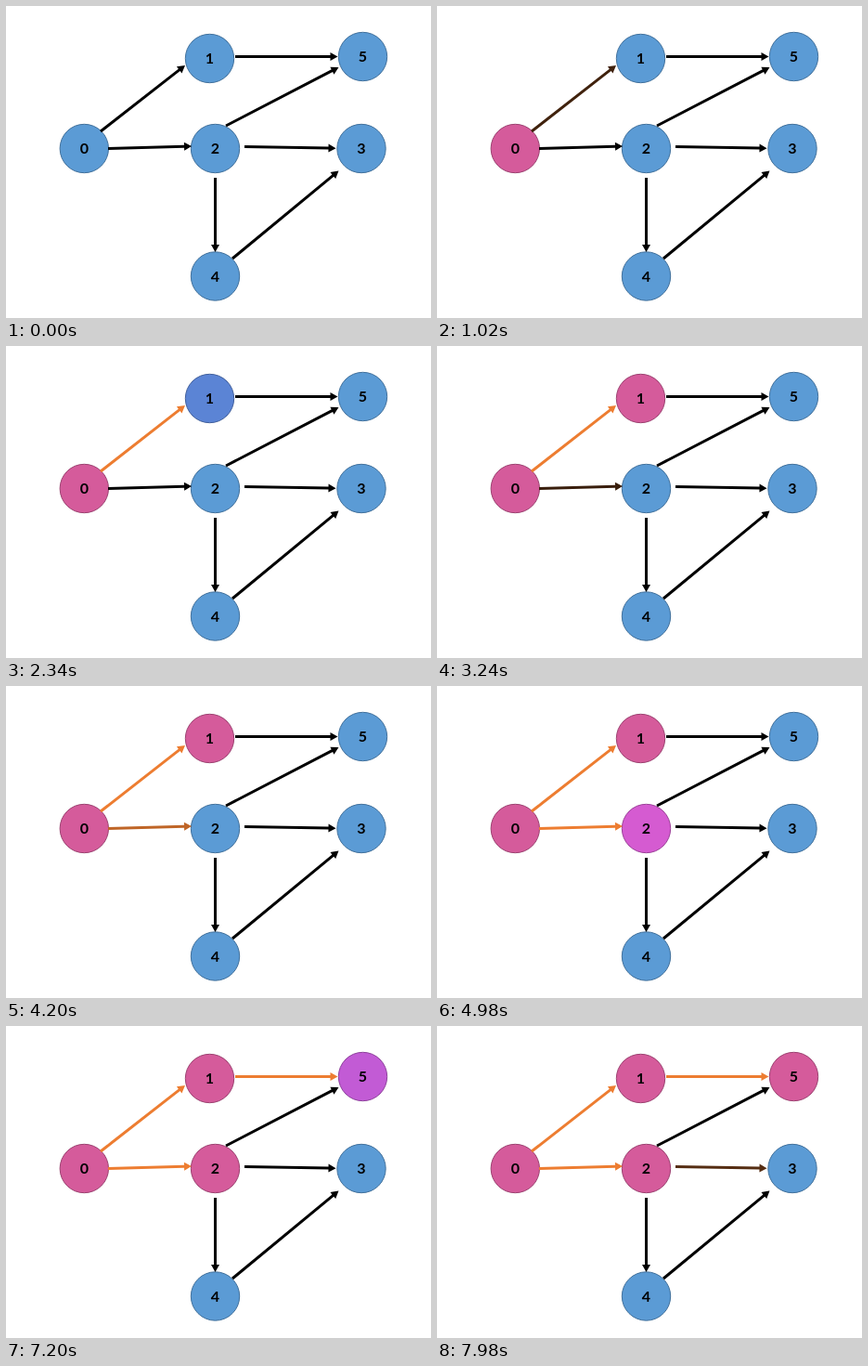
An HTML page that plays this animation: 458 by 336 pixels, repeating every 8000 ms.

```html
<!DOCTYPE html>
<html lang="en">
<head>
<meta charset="utf-8">
<title>Graph traversal</title>
<style>
  html, body { margin: 0; width: 100%; height: 100%; overflow: hidden; background: #fff; }
  svg { display: block; width: 458px; height: 336px; }
  text { font: 700 16px Lato, "Noto Sans", sans-serif; text-anchor: middle; }
</style>
</head>
<body>
<svg viewBox="0 0 458 336"></svg>
<script>
const LOOP = 8000, TICK = 60;
const START = 20, CYCLE = 2270, NODE_TIME = 540, EDGE_TIME = 1700;
const ORANGE = [237, 125, 49];

const nodes = [[84.3, 153.5], [219.5, 56.5], [225.5, 153.5], [383, 153.5], [225.5, 291], [384.5, 54.5]];
const edges = [
  [102, 135, 193, 64],        // 0 to 1
  [110, 153.5, 200, 151],     // 0 to 2
  [247, 54.5, 357.5, 54.5],   // 1 to 5
  [257, 151.5, 355.5, 153.2], // 2 to 3
  [237, 129, 358.5, 66],      // 2 to 5
  [225.5, 185, 225.5, 265],   // 2 to 4
  [244, 272, 358.5, 177.5]    // 4 to 3
];
// Each visited node is followed by the edge with the same position in the order.
const visitOrder = [0, 1, 2, 5];

const svg = document.querySelector("svg");

function add(tag, attributes) {
  const element = document.createElementNS("http://www.w3.org/2000/svg", tag);
  for (const name in attributes) element.setAttribute(name, attributes[name]);
  return svg.appendChild(element);
}

const circles = nodes.map(([cx, cy], i) => {
  const circle = add("circle", { cx, cy, r: 26.2, "stroke-width": 1 });
  add("text", { x: cx, y: cy + 5.7 }).textContent = i;
  return circle;
});

const arrows = edges.map(([x1, y1, x2, y2]) => {
  const length = Math.hypot(x2 - x1, y2 - y1);
  const angle = Math.atan2(y2 - y1, x2 - x1) * 180 / Math.PI;
  return add("path", {
    d: `M0-1.5H${length - 8}V-4.5L${length} 0L${length - 8} 4.5V1.5H0Z`,
    transform: `translate(${x1} ${y1}) rotate(${angle})`
  });
});

const progress = (time, start, duration) => Math.min(1, Math.max(0, (time - start) / duration));

function paintNode(circle, p) {
  const hue = 208.5 + 120 * p;
  circle.setAttribute("fill", `hsl(${hue}, 59.2%, 59.6%)`);
  circle.setAttribute("stroke", `hsl(${hue}, 41%, 43%)`);
}

function paintEdge(arrow, p) {
  arrow.setAttribute("fill", `rgb(${ORANGE.map(c => Math.round(c * p))})`);
}

function draw(now) {
  const time = Math.floor(now % LOOP / TICK) * TICK;
  circles.forEach((circle, i) => {
    const turn = visitOrder.indexOf(i);
    paintNode(circle, turn < 0 ? 0 : progress(time, START + turn * CYCLE, NODE_TIME));
  });
  arrows.forEach((arrow, i) => {
    paintEdge(arrow, progress(time, START + NODE_TIME + i * CYCLE, EDGE_TIME));
  });
}

const began = performance.now();
function frame() {
  draw(performance.now() - began);
  requestAnimationFrame(frame);
}
frame();
</script>
</body>
</html>
```
